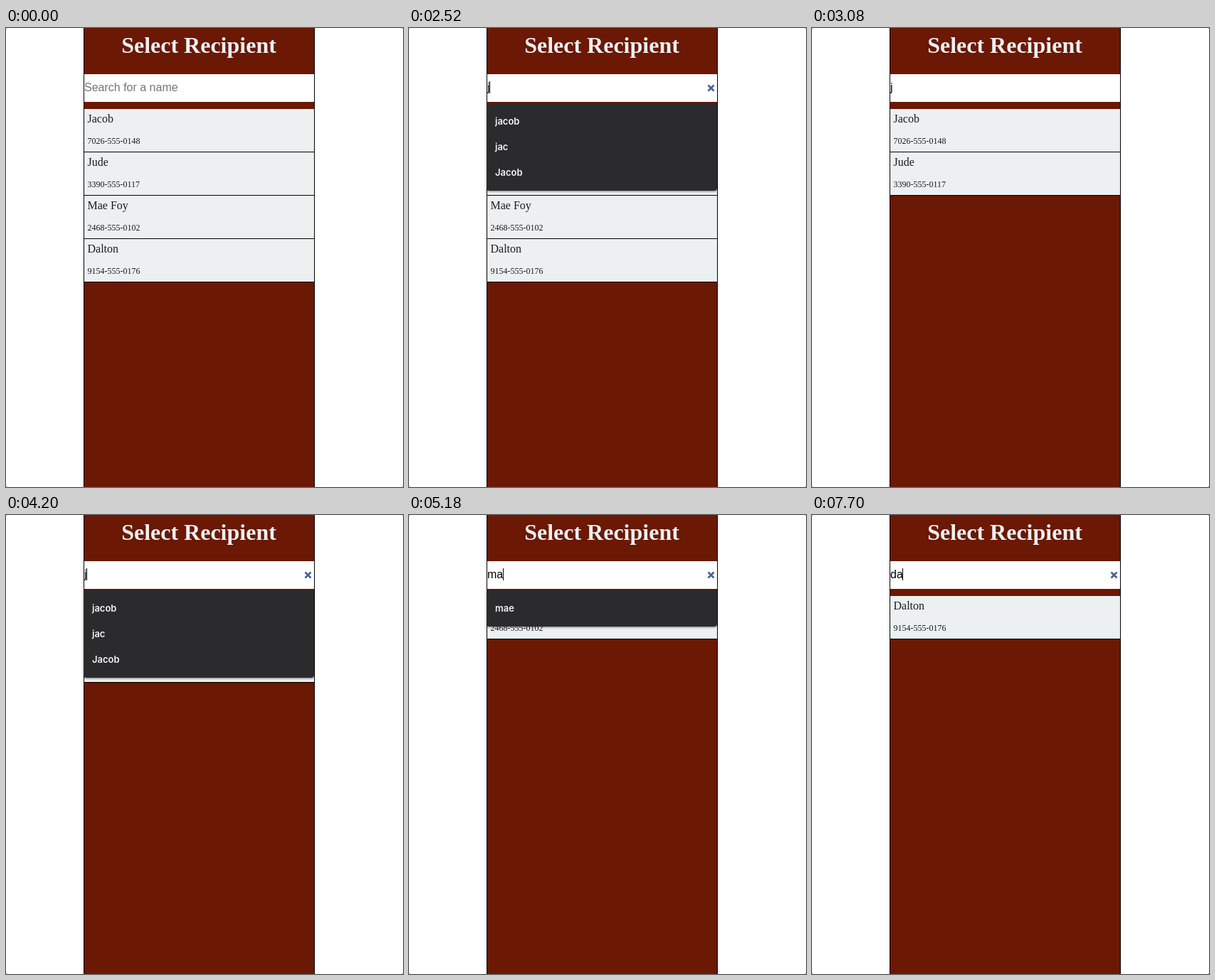
These frames come from a looping animation (558x646 px, 8 s). An HTML page:

```html
<!DOCTYPE html>
<html lang="en">
<head>
<meta charset="utf-8">
<title>Select Recipient</title>
<style>
  html, body { margin: 0; width: 100%; height: 100%; overflow: hidden; background: #777; }
  svg { display: block; width: 558px; height: 646px; }
  text { font: 16px "Liberation Serif", "Times New Roman", serif; fill: #1c1c1c; }
  .title { font-size: 32px; font-weight: bold; fill: #ecf0f1; text-anchor: middle; }
  .phone { font-size: 12px; }
  .query { font-family: "Liberation Sans", Arial, sans-serif; fill: #000; }
  .hint { fill: #757575; }
  .option { font: 600 13px Inter, sans-serif; fill: #f4f4f4; }
  .menu { fill: #2b2b2d; filter: drop-shadow(0 1px 1.5px rgba(0, 0, 0, .5)); }
</style>
</head>
<body>
<svg viewBox="0 0 558 646">
  <rect width="558" height="646" rx="2" fill="#fff"/>
  <rect x="109" width="325" height="646" fill="#000"/>
  <rect x="110" width="323" height="646" fill="#6b1805"/>
  <text class="title" x="271" y="35">Select Recipient</text>
  <rect x="110" y="65" width="323" height="39" fill="#fff"/>
  <g id="view"></g>
</svg>
<script>
const LOOP = 8000;
const people = [
  ["Jacob", "7026-555-0148"],
  ["Jude", "3390-555-0117"],
  ["Mae Foy", "2468-555-0102"],
  ["Dalton", "9154-555-0176"],
];
const jOptions = ["jacob", "jac", "Jacob"];

// Each step changes part of the state from its time (ms) on.
const steps = [
  [0, { query: "", filter: "", options: [], caret: false, clear: false, selected: false }],
  [700, { caret: true }],
  [1260, { caret: false }],
  [1750, { caret: true }],
  [2240, { caret: false }],
  [2520, { query: "j", options: jOptions, caret: true, clear: true }],
  [2660, { filter: "j" }],
  [3080, { options: [], caret: false, clear: false }],
  [3990, { clear: true }],
  [4200, { options: jOptions, caret: true }],
  [4690, { caret: false }],
  [4760, { query: "", options: [], clear: false }],
  [4900, { filter: "" }],
  [5110, { query: "m", options: ["mae"], caret: true, clear: true }],
  [5180, { query: "ma", filter: "ma" }],
  [5250, { query: "mae", options: [] }],
  [5810, { caret: false, clear: false }],
  [5950, { clear: true }],
  [6020, { selected: true }],
  [6510, { query: "d", selected: false, caret: true }],
  [6580, { query: "da", filter: "da" }],
  [7140, { caret: false }],
  [7700, { caret: true }],
];

const view = document.getElementById("view");
const pen = document.createElement("canvas").getContext("2d");
pen.font = '16px "Liberation Sans", Arial, sans-serif';

const rect = (x, y, w, h, fill) =>
  `<rect x="${x}" y="${y}" width="${w}" height="${h}" fill="${fill}"/>`;
const text = (x, y, cls, str) => `<text x="${x}" y="${y}" class="${cls}">${str}</text>`;

function row([name, phone], i) {
  const y = 114 + i * 61;
  return rect(110, y, 323, 60, "#ecf0f1") + rect(110, y + 60, 323, 1, "#000") +
    text(114.5, y + 19, "name", name) + text(114.5, y + 49, "phone", phone);
}

function menu(options) {
  if (!options.length) return "";
  const bottom = 121 + options.length * 36;
  return `<path class="menu" d="M109 106H433V${bottom - 4}q0 4-4 4H113q-4 0-4-4z"/>` +
    options.map((o, i) => text(121, 136 + i * 36, "option", o)).join("");
}

function render(s) {
  const width = Math.floor(pen.measureText(s.query).width);
  const found = people.filter(p => p[0].toLowerCase().includes(s.filter));
  view.innerHTML =
    found.map(row).join("") +
    (s.selected ? rect(110, 75, width, 18, "#b3d7fe") : "") +
    (s.query ? text(110, 89, "query", s.query) : text(110, 89, "query hint", "Search for a name")) +
    (s.caret ? rect(110 + width, 75, 1, 17, "#000") : "") +
    (s.clear ? '<path d="M420.5 80.5l8 8m0-8l-8 8" stroke="#416399" stroke-width="2.6"/>' : "") +
    menu(s.options);
}

let shown = -1;
function tick(now) {
  const t = now % LOOP;
  const count = steps.filter(step => step[0] <= t).length;
  if (count !== shown) {
    shown = count;
    render(Object.assign({}, ...steps.slice(0, count).map(step => step[1])));
  }
  requestAnimationFrame(tick);
}
tick(0);
</script>
</body>
</html>
```
